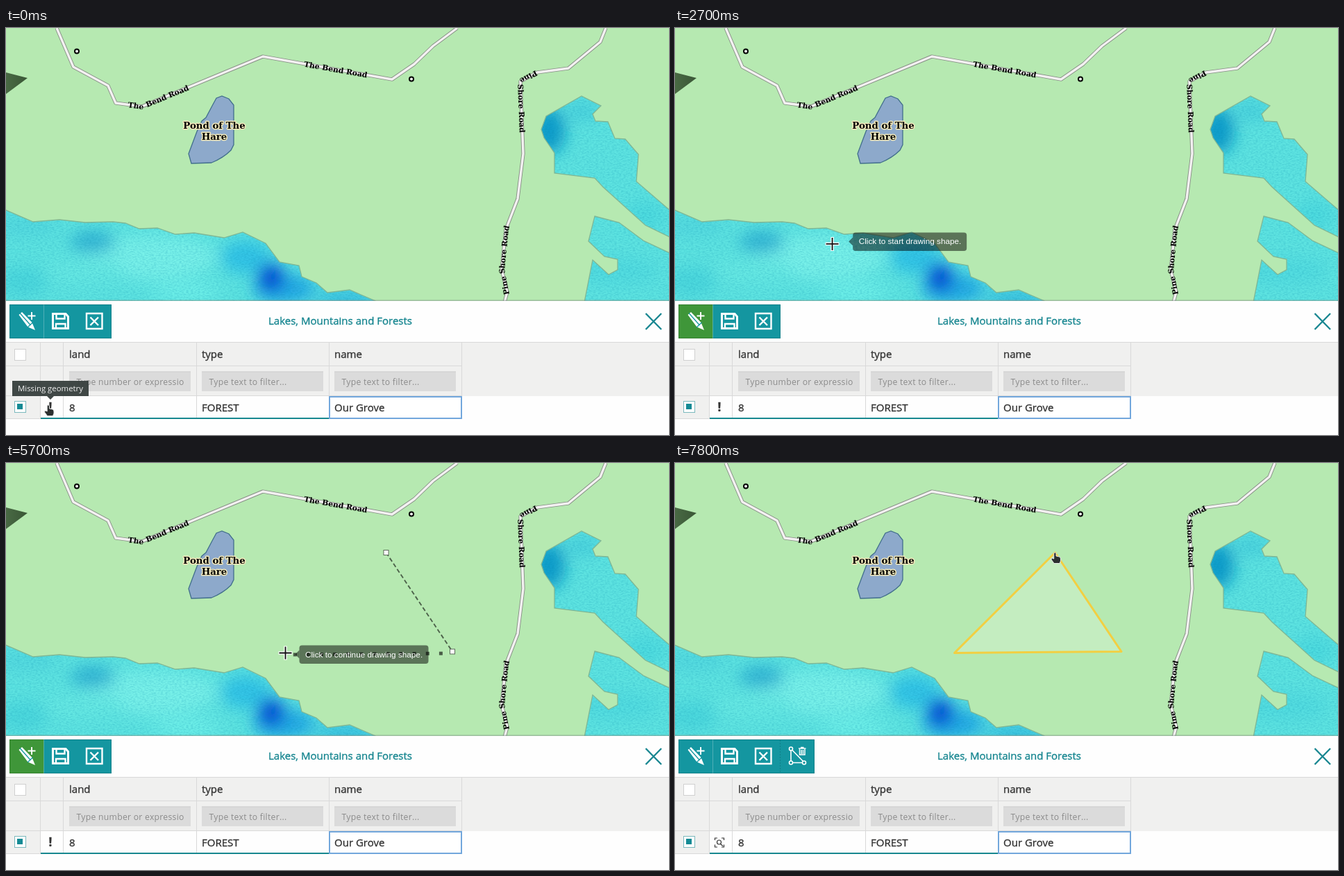
An HTML page for the animation above (8000 ms loop, 955 by 586 pixels).

```html
<!DOCTYPE html>
<html lang="en">
<head>
<meta charset="utf-8">
<title>Drawing a shape on a map</title>
<style>
html, body { margin: 0; width: 100%; height: 100%; overflow: hidden; background: #fefefe; }
svg { position: absolute; left: 0; top: 0; }
#base { will-change: transform; }
text { font: 500 15px "Open Sans", "Noto Sans", sans-serif; fill: #333; stroke: #333; stroke-width: .35px; }
.map text { font: bold 10.8px "DejaVu Serif", serif; fill: #000; stroke: none; }
.map .lake { font-size: 13.3px; text-anchor: middle; stroke: #f1e8bb; stroke-width: 3px; stroke-linejoin: round; paint-order: stroke; }
text.hint { font-size: 12.2px; letter-spacing: .28px; fill: #8b8b8b; stroke: none; }
text.note { font-size: 11.4px; font-weight: 400; fill: #f2f2f2; stroke: none; text-anchor: middle; }
text.tip { font: 11.75px "Liberation Sans", Arial, sans-serif; fill: #fff; stroke: none; }
text.title { fill: #15858f; stroke: #15858f; text-anchor: middle; }
.icon { fill: none; stroke: #fff; stroke-width: 2; }
</style>
</head>
<body>
<svg id="base" width="955" height="586" viewBox="0 0 955 586">
  <defs>
    <path id="water" d="M-3 261 39 279 77 276 114 280 154 279 172 281 192 289 218 288 244 297 271 295 314 302 341 294 374 310 394 337 422 342 426 358 447 367 463 381 495 377 532 393V400H-3Z
      M771 146 778 127 829 98 857 112 845 124 849 134 867 135 877 159 892 160 911 182 908 221 958 264V302L921 284 860 229 848 216 790 209V180L775 158Z
      M848 271 883 280 918 306 958 325V400H832L845 334 868 355 881 348V333L862 329 839 307Z"/>
    <clipPath id="shore"><use href="#water"/></clipPath>
    <path id="long" d="M73 0 97 56 147 83 158 108 196 113 370 41 556 74 588 52 615 26 650 0"/>
    <path id="coast" d="M864 0 856 20 810 58 765 64 741 77 745 181 737 246 720 290 714 348 722 380 718 395"/>
    <path id="coastUp" d="M721 384 714 348 720 290 725 270"/>
    <linearGradient id="rock" x2="1"><stop stop-color="#496a44"/><stop offset="1" stop-color="#3a5636"/></linearGradient>
    <filter id="blur" x="-20%" y="-20%" width="140%" height="140%"><feGaussianBlur stdDeviation="11"/></filter>
    <filter id="grain" x="0" y="0" width="1" height="1" color-interpolation-filters="sRGB">
      <feTurbulence type="fractalNoise" baseFrequency=".3 .55" numOctaves="2" seed="4"/>
      <feColorMatrix values="0 0 0 0 0  0 0 0 0 .5  0 0 0 0 .65  0 .45 0 0 -.16" result="n"/>
      <feMerge><feMergeNode in="SourceGraphic"/><feMergeNode in="n"/></feMerge>
    </filter>
    <clipPath id="field"><rect x="91" y="495" width="165" height="28"/></clipPath>
  </defs>
  <g class="map">
    <rect width="955" height="394" fill="#b6e9b1"/>
    <g clip-path="url(#shore)"><g filter="url(#grain)">
      <rect y="90" width="955" height="304" fill="#5ee4e1"/>
      <g id="depths" filter="url(#blur)"></g>
    </g></g>
    <use href="#water" fill="none" stroke="#7fb795" stroke-width="1.3"/>
    <path d="M0 64 31 72 0 95Z" fill="url(#rock)"/>
    <g fill="none" stroke-linejoin="round">
      <g stroke="#858c84" stroke-width="5.2"><use href="#long"/><use href="#coast"/></g>
      <g stroke="#f3f1f1" stroke-width="3.4"><use href="#long"/><use href="#coast"/></g>
    </g>
    <g fill="#fff" stroke="#000" stroke-width="2"><circle cx="102" cy="33.5" r="3"/><circle cx="584" cy="73.5" r="3"/></g>
    <path d="M263 181 275 149 282 134 288 129 297 112 303 101 311 98 321 102 328 111V168L324 176Q313 187 296 194L267 195Z" fill="#8da9cb" stroke="#426f8c" stroke-width="1.3"/>
    <text class="lake" x="300" y="145">Pond of The</text>
    <text class="lake" x="300" y="161">Hare</text>
    <text dy="4"><textPath href="#long" startOffset="163">The Bend Road</textPath></text>
    <text dy="4"><textPath href="#long" startOffset="432">The Bend Road</textPath></text>
    <text dy="4"><textPath href="#coast" startOffset="127">Pine Shore Road</textPath></text>
    <text dy="4"><textPath href="#coastUp">Pine Shore Road</textPath></text>
  </g>

  <rect y="391.5" width="955" height="2" fill="#7c8f84" opacity=".5"/>
  <rect y="393" width="955" height="193" fill="#fefefe"/>
  <text class="title" x="481.5" y="427">Lakes, Mountains and Forests</text>
  <path d="M921.5 411 944 434M944 411 921.5 434" stroke="#1a8791" stroke-width="2.4"/>

  <path d="M0 453H955V530H49V562H0Z" fill="#f0f0ef"/>
  <path d="M0 452.5H955M0 486.5H656M0 529.5H656M0 562.5H50M49.5 453V562M82.5 453V562M274.5 453V562M465.5 453V530M656.5 453V530" fill="none" stroke="#d9d9d9"/>
  <rect x="12.5" y="462.5" width="16" height="16" fill="#fff" stroke="#d0d0d0"/>
  <rect x="12.5" y="537.5" width="16" height="16" fill="#fff" stroke="#7bb9bd"/>
  <rect x="16" y="541" width="8" height="8" fill="#138a94"/>
  <path d="M50 562H465" stroke="#17888f" stroke-width="2"/>
  <rect x="466" y="531" width="190" height="31" fill="#fff" stroke="#72a7dc" stroke-width="2"/>
  <g id="cells"></g>
</svg>
<svg id="live" width="955" height="586" viewBox="0 0 955 586"></svg>

<script>
const $ = id => document.getElementById(id);
const TEAL = '#1496a0', SHADE = 'rgba(0,0,0,.5)';

// Water tints: x, y, rx, ry, colour
$('depths').innerHTML = [
  [210, 330, 95, 32, '#78f1e9'], [30, 285, 45, 14, '#52d9df'], [125, 308, 32, 16, '#30b6d4'],
  [110, 350, 60, 18, '#66e9e3'], [25, 365, 35, 22, '#4cd8dd'], [345, 330, 36, 24, '#30c4e6'],
  [400, 375, 45, 22, '#22a9e4'], [382, 359, 19, 21, '#0648d6'], [490, 390, 45, 14, '#38c0e0'],
  [260, 380, 50, 16, '#6defe8'], [782, 148, 24, 34, '#0c9cca'], [830, 120, 25, 14, '#48d2dd'],
  [880, 350, 60, 20, '#52dde0'], [920, 270, 30, 20, '#4edbdf']
].map(([x, y, rx, ry, c]) => `<ellipse cx="${x}" cy="${y}" rx="${rx}" ry="${ry}" fill="${c}"/>`).join('');

$('cells').innerHTML = [
  [91, 'land', 'Type number or expression', '8'],
  [282, 'type', 'Type text to filter...', 'FOREST'],
  [473, 'name', 'Type text to filter...', 'Our Grove']
].map(([x, head, hint, value]) => `
  <text x="${x}" y="475">${head}</text>
  <rect x="${x}" y="494.5" width="175" height="28.5" fill="#dbdbdb"/>
  <path d="M${x} 495h175" stroke="#cfcfcf"/>
  <text class="hint" x="${x + 10.5}" y="513.5" ${x < 100 ? 'clip-path="url(#field)"' : ''}>${hint}</text>
  <text x="${x}" y="551.5">${value}</text>`).join('');

const A = [547.5, 129], B = [643, 271.5], C = [402.5, 273.5];

// Pointer: time, x, y
const moves = [
  [0, 61, 543], [100, 90, 545], [600, 90, 545], [1400, 34, 420], [2400, 34, 420],
  [3200, ...A], [3400, ...A], [3500, 549, 135], [3600, 549, 135], [4000, 680, 283],
  [4200, ...B], [4800, ...B], [4900, 572, 272], [5200, 572, 272], [5700, ...C],
  [6000, ...C], [6100, 405, 270], [6200, 405, 270], [6800, 525, 145], [7100, ...A], [8000, ...A]
];

function pointer(t) {
  const i = Math.max(1, moves.findIndex(m => m[0] >= t));
  const [t0, x0, y0] = moves[i - 1], [t1, x1, y1] = moves[i];
  const k = (t - t0) / (t1 - t0);
  return [x0 + (x1 - x0) * k, y0 + (y1 - y0) * k];
}

const icons = [
  `<path d="M18.5 413 23 409 37.500 424 42 435 31.500 430.500Z" fill="#fff" stroke="none"/>
   <path d="M20 410.5 35.5 428M31 431 38.500 424" stroke="${TEAL}" stroke-width="1.3"/>
   <path d="M37 409v11M31.5 414.5h11"/>`,
  `<path d="M67.5 411.5H86L89.500 415.5V432.5H67.5Z" stroke-width="3"/>
   <path d="M72.500 411V418.500H84.500V411M72 433V426H85.500V433" stroke-width="2.3"/>`,
  `<path d="M116 411H138.5V433H116ZM121.5 416.5 133 428M133 416.5 121.5 428" stroke-width="2.4"/>`,
  `<path d="M167 413V430M168.5 413 185 430M169 431.5H184" stroke-width="1.6"/>
   <g fill="${TEAL}" stroke-width="1.6"><circle cx="167" cy="411.5" r="2.5"/><circle cx="167" cy="431.5" r="2.5"/><circle cx="186" cy="431.5" r="2.5"/></g>
   <path d="M178 411H188.5M181 409.5H185.5M179.5 412V420H187V412M182 413V419M184.5 413V419" stroke-width="1.5"/>`
];

function toolbar(t, done) {
  const n = done ? 4 : 3;
  const first = t >= 1300 && t < 2000 ? '#0c626b' : t >= 2000 && !done ? '#3f9639' : TEAL;
  return `<rect x="5" y="398" width="49.5" height="49" fill="${first}"/>
    <rect x="54.5" y="398" width="${n * 49 - 49.5}" height="49" fill="${TEAL}"/>
    <rect x="5.5" y="398.5" width="${n * 49 - 1}" height="48" fill="none" stroke="#000" stroke-opacity=".14"/>
    ${done ? '<path d="M151.5 399V447" stroke="#0e7f88" stroke-dasharray="2 2"/>' : ''}
    <g class="icon">${icons.slice(0, n).join('')}</g>`;
}

function note(x, y, w, h, px, lines, alpha) {
  return `<g opacity="${alpha}"><path d="M${x} ${y}h${w}v${h}H${px + 5}l-5 5-5-5H${x}Z" fill="#39413f" opacity=".96"/>
    ${lines.map((s, i) => `<text class="note" x="${x + w / 2 - (x ? 0 : 4)}" y="${y + 15 + i * 16}">${s}</text>`).join('')}</g>`;
}

function tip([x, y], text, w) {
  const l = x + 20, m = y + 2;
  return `<rect x="${l}" y="${m - 13}" width="${w}" height="26.5" rx="4" fill="${SHADE}"/>
    <path d="M${l} ${m - 6}v12l-6-6Z" fill="${SHADE}"/>
    <text class="tip" x="${l + 8.5}" y="${m + 4}">${text}</text>`;
}

// Square dots from the last corner towards the pointer
function guide([x0, y0], [x1, y1]) {
  const len = Math.hypot(x1 - x0, y1 - y0);
  let s = '';
  for (let d = 19.1; d < len; d += 19.1)
    s += `<rect x="${x0 + (x1 - x0) * d / len}" y="${y0 + (y1 - y0) * d / len}" width="5" height="5"/>`;
  return `<g fill="#000" opacity=".6">${s}</g>`;
}

function shape(t, p, done) {
  if (done) return `<path d="M${A}L${B}L${C}Z" fill="#fff" fill-opacity=".2" stroke="#f2cf42" stroke-width="3" stroke-linejoin="round"/>`;
  if (t < 3500) return '';
  const pts = [A, B, C].slice(0, t < 4900 ? 1 : t < 6000 ? 2 : 3);
  return `<path d="M${pts.join('L')}" fill="#fff" fill-opacity=".2" stroke="#000" stroke-opacity=".58" stroke-width="1.9" stroke-dasharray="6 3.5"/>
    ${guide(pts[pts.length - 1], p)}
    ${pts.map(([x, y]) => `<rect x="${x - 3.5}" y="${y - 3.5}" width="7" height="7" fill="#fff" stroke="#5d6b5b"/>`).join('')}`;
}

function cursor(t, [x, y]) {
  return `<g transform="translate(${x} ${y})">` + (t >= 2500 && t < 7200 && y < 393
    ? `<path d="M-10 0H10M0-10V10" stroke="#fff" stroke-width="4.4"/><path d="M-9 0H9M0-9V9" stroke="#111" stroke-width="1.8"/>`
    : `<path d="M-1.8 1Q0-1.5 1.5 1V5L6 6Q8 6.5 8 9V12L6.5 15.5H-1.5L-5.5 10Q-6 8-4 8L-1.8 9Z" fill="#2c3030" stroke="#e8e8e8" stroke-width="1"/>`) + '</g>';
}

function draw(t) {
  const done = t >= 7800, p = pointer(t), q = pointer(Math.min(t + 15, 7999));
  let s = shape(t, p, done) + toolbar(t, done);
  s += done
    ? `<path d="M57.5 543V540H61M67 540H70.5V543M70.5 549.5V553H67M61 553H57.5V549.5M65.5 548.5 69 551.5" fill="none" stroke="#333" stroke-width="1.2"/>
       <circle cx="63.5" cy="546" r="3" fill="none" stroke="#333" stroke-width="1.2"/>`
    : '<text x="64" y="552" text-anchor="middle" style="font-size:17px;font-weight:700">!</text>';
  if (t < 400) s += note(9, 508, 110, 22, 64, ['Missing geometry'], t < 100 ? 1 : .5);
  if (t >= 1400 && t < 2100)
    s += note(0, 352, 182.5, 38, 30, ['Add a shape to the existing', 'geometry'], t < 1700 ? .6 : t < 2000 ? 1 : .4);
  if (t >= 2500 && t < 3300 && p[1] < 393) s += tip(q, 'Click to start drawing shape.', 164);
  if (t >= 3700 && t < 6000) s += tip(q, 'Click to continue drawing shape.', 186);
  if (t >= 6000 && !done) s += tip(q, 'Click first point to close this shape.', 194);
  $('live').innerHTML = s + cursor(t, p);
}

let shown = -1;
function tick() {
  const t = Math.floor(performance.now() % 8000 / 100) * 100;
  if (t !== shown) draw(shown = t);
  requestAnimationFrame(tick);
}
tick();
</script>
</body>
</html>
```
